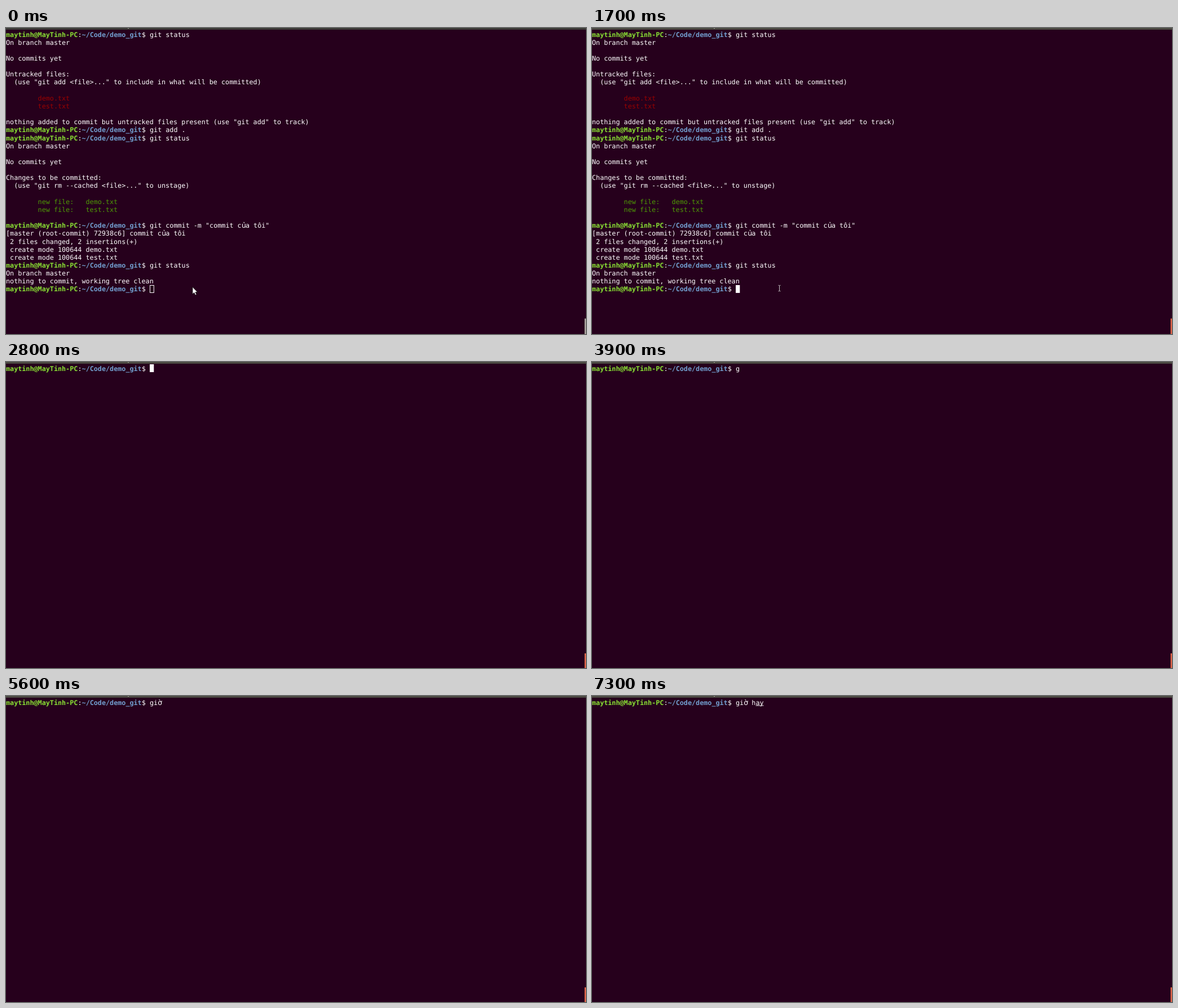
Animation of 1029 by 544 pixels, one loop 8 s. Source, as an HTML page:

```html
<!DOCTYPE html>
<html lang="en">
<head>
<meta charset="utf-8">
<title>Terminal</title>
<style>
  html, body { margin: 0; width: 100%; height: 100%; overflow: hidden; background: #26001c; }
  svg { display: block; }
  text {
    font: 11.765px "DejaVu Sans Mono", monospace;
    white-space: pre;
    text-rendering: geometricPrecision;
    fill: #fff;
  }
  .wide { font: 12.5px "DejaVu Sans", sans-serif; }
  .user { fill: #8ae234; font-weight: bold; }
  .path { fill: #729fcf; font-weight: bold; }
  .red { fill: #9c0000; }
  .green { fill: #4e9a06; }
</style>
</head>
<body>
<svg width="1029" height="544" viewBox="0 0 1029 544">
  <rect width="1029" height="544" fill="#26001c"/>
  <rect id="bar" width="1029" height="3"/>
  <rect x="216" width="2" height="1" fill="#aaa89f"/>
  <g id="history"></g>
  <g id="prompt"></g>
  <g id="typed"></g>
  <rect id="cursor"/>
  <rect id="scroll" x="1026.5" width="2.5" height="30"/>
  <path id="arrow" d="M331 460.5V473l2.9-2.6 2 4.4 2-.9-2-4.3h3.8z" fill="#fff" stroke="#111" stroke-width=".7"/>
  <path id="beam" d="M330.5 457.5h1.2l.8.7.8-.7h1.2M332.5 458v9.5M330.5 467.8h1.2l.8-.7.8.7h1.2" fill="none" stroke="#ddd" stroke-width=".9"/>
</svg>
<script>
const LOOP = 8000, CELL_W = 7.083, CELL_H = 14.156, TOP = 3.9, BASELINE = 11.6;
const PROMPT = [['user', 'maytinh@MayTinh-PC'], ['', ':'], ['path', '~/Code/demo_git'], ['', '$ ']];
const PROMPT_COLS = 36, LAST_ROW = 32;

const HISTORY = `$git status
On branch master

No commits yet

Untracked files:
  (use "git add <file>..." to include in what will be committed)

-        demo.txt
-        test.txt

nothing added to commit but untracked files present (use "git add" to track)
$git add .
$git status
On branch master

No commits yet

Changes to be committed:
  (use "git rm --cached <file>..." to unstage)

+        new file:   demo.txt
+        new file:   test.txt

$git commit -m "commit của tôi"
[master (root-commit) 72938c6] commit của tôi
 2 files changed, 2 insertions(+)
 create mode 100644 demo.txt
 create mode 100644 test.txt
$git status
On branch master
nothing to commit, working tree clean`.split('\n');

// [time, committed text, underlined input still being composed]
const TYPING = [
  [0, '', ''], [3900, 'g', ''], [4000, 'g', 'i'], [4100, 'g', 'io'],
  [4300, 'g', 'iơ'], [4400, 'g', 'iờ'], [4600, 'g', ''], [4700, 'giờ ', ''],
  [7000, 'giờ h', ''], [7100, 'giờ h', 'a'], [7300, 'giờ h', 'ay']
];
const CURSOR = [
  [0, true], [1100, false], [1700, true], [2300, false], [2600, true],
  [3300, false], [5100, true], [5600, false], [6300, true], [7000, false]
];

const $ = id => document.getElementById(id);
const at = (steps, time) => steps.findLast(step => step[0] <= time);
const setAttrs = (node, attrs) => {
  for (const key in attrs) node.setAttribute(key, attrs[key]);
  return node;
};
const show = (id, visible) => setAttrs($(id), { visibility: visible ? 'visible' : 'hidden' });

function add(parent, tag, attrs, content = '') {
  const node = setAttrs(document.createElementNS('http://www.w3.org/2000/svg', tag), attrs);
  node.textContent = content;
  parent.append(node);
}

// Letters missing from the terminal font use a larger face but keep their cell.
function write(parent, row, col, content, style = '') {
  for (const run of content.split(/([ủơờ])/)) {
    add(parent, 'text', {
      x: col * CELL_W,
      y: TOP + row * CELL_H + BASELINE,
      class: /[ủơờ]/.test(run) ? 'wide' : style
    }, run);
    col += run.length;
  }
}

function writePrompt(parent, row) {
  let col = 0;
  for (const [style, part] of PROMPT) {
    write(parent, row, col, part, style);
    col += part.length;
  }
}

HISTORY.forEach((line, row) => {
  const mark = line[0], body = line.slice(1);
  if (mark === '$') {
    writePrompt($('history'), row);
    write($('history'), row, PROMPT_COLS, body);
  } else if (mark === '-' || mark === '+') {
    write($('history'), row, 0, body, mark === '-' ? 'red' : 'green');
  } else if (line) {
    write($('history'), row, 0, line);
  }
});
writePrompt($('history'), LAST_ROW);
writePrompt($('prompt'), 0);

let lastStep;
function drawTyping(step) {
  if (step === lastStep) return;
  lastStep = step;
  const [, done, pending] = step, group = $('typed');
  const pendingCol = PROMPT_COLS + done.length;
  group.replaceChildren();
  write(group, 0, PROMPT_COLS, done);
  write(group, 0, pendingCol, pending);
  add(group, 'rect', {
    x: pendingCol * CELL_W, y: 16.6, width: pending.length * CELL_W, height: .9, fill: '#fff'
  });
}

function draw(time) {
  const focused = time >= 500, cleared = time >= 2800;
  const step = at(TYPING, time), inset = focused ? 0 : .5;
  show('history', !cleared);
  show('prompt', cleared);
  show('arrow', time < 200);
  show('beam', time >= 200 && !cleared);
  show('cursor', at(CURSOR, time)[1]);
  drawTyping(step);
  setAttrs($('bar'), { fill: focused ? '#4b4a42' : '#3c3b37' });
  setAttrs($('scroll'), { y: cleared ? 518 : 516.5, fill: focused ? '#e0674a' : '#aaa69f' });
  setAttrs($('cursor'), {
    x: Math.round((PROMPT_COLS + step[1].length) * CELL_W - .4) + inset,
    y: (cleared ? 4 : 457) + inset,
    width: 7.3 - inset,
    height: 14 - 2 * inset,
    fill: focused ? '#fff' : 'none',
    stroke: focused ? 'none' : '#fff'
  });
}

const start = performance.now();
function tick() {
  draw((performance.now() - start) % LOOP);
  requestAnimationFrame(tick);
}
tick();
</script>
</body>
</html>
```
